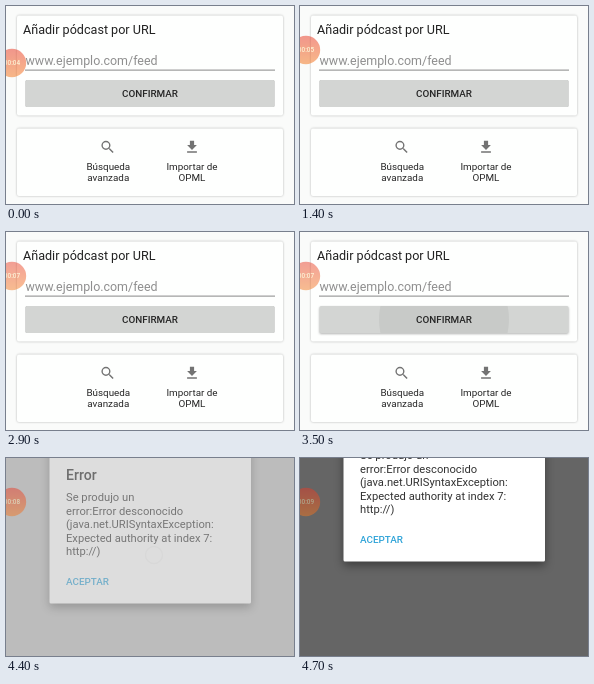
An HTML page that plays this animation: 288x198 px, repeating every 5300 ms.

```html
<!DOCTYPE html>
<html lang="es">
<head>
<meta charset="utf-8">
<title>Añadir pódcast</title>
<style>
html, body { margin: 0; width: 100%; height: 100%; overflow: hidden; background: #fafbfa; }
svg { display: block; width: 100vw; height: 100vh; font-family: Roboto, sans-serif; }
.card { fill: #fefffe; filter: drop-shadow(0 .7px .9px rgba(0,0,0,.28)); }
.label { font-size: 9.85px; fill: #262626; text-anchor: middle; }
.icon { fill: #737373; }
.body { font-size: 11.2px; fill: #333; }
.bold { font-weight: 500; }
</style>
</head>
<body>
<svg viewBox="0 0 288 198">
  <defs>
    <linearGradient id="fire" x1="0" y1="0" x2="0" y2="1">
      <stop offset="0" stop-color="#e93a27"/>
      <stop offset="1" stop-color="#f4791f"/>
    </linearGradient>
    <clipPath id="btnClip"><rect x="19.5" y="74" width="249" height="27" rx="1.5"/></clipPath>
  </defs>
  <rect width="288" height="198" fill="#fafbfa"/>

  <g id="page">
    <rect class="card" x="11" y="9.5" width="266" height="100" rx="2"/>
    <text x="17" y="28" font-size="12.6" fill="#222">Añadir pódcast por URL</text>
    <text x="19.5" y="58.5" font-size="12.45" fill="#8f8f8f">www.ejemplo.com/feed</text>
    <rect x="19" y="63.6" width="250" height="1" fill="#888"/>
    <rect id="btn" x="19.5" y="74" width="249" height="27" rx="1.5" fill="#d3d5d3"/>
    <circle id="ripple" cx="144" cy="87.5" r="0" fill="#000" clip-path="url(#btnClip)"/>
    <text class="label bold" x="144" y="91">CONFIRMAR</text>

    <rect class="card" x="11" y="122.5" width="266" height="67.5" rx="2"/>
    <path class="icon" transform="translate(93.3 132.7) scale(.7)" d="M15.5 14h-.79l-.28-.27A6.47 6.47 0 0 0 16 9.5 6.5 6.5 0 1 0 9.5 16c1.61 0 3.09-.59 4.23-1.57l.27.28v.79l5 4.99L20.49 19l-4.99-5zm-6 0a4.5 4.5 0 1 1 0-9 4.5 4.5 0 0 1 0 9z"/>
    <path class="icon" transform="translate(177.6 132.7) scale(.7)" d="M19 9h-4V3H9v6H5l7 7 7-7zM5 18v2h14v-2H5z"/>
    <text class="label" x="102.3" y="163.5">Búsqueda</text>
    <text class="label" x="102.3" y="175">avanzada</text>
    <text class="label" x="186" y="163.5">Importar de</text>
    <text class="label" x="186" y="175">OPML</text>
  </g>

  <rect id="dim" width="288" height="198" fill="#000" opacity="0"/>

  <g id="dialog" opacity="0">
    <rect x="43.5" y="-30" width="201.5" height="167.5" rx="1.5" fill="#fff" style="filter:drop-shadow(0 4px 5px rgba(0,0,0,.4))"/>
    <text class="bold" x="60" y="14" font-size="14.1" fill="#222">Error</text>
    <g id="message" class="body"></g>
    <text class="bold" x="60" y="119" font-size="9.85" fill="#2ea3d8">ACEPTAR</text>
    <circle id="spinner" cx="148" cy="89" r="8.5" fill="none" stroke="#f5f5f5" stroke-width="1.5"/>
  </g>

  <g id="bubble">
    <circle r="16.3" fill="url(#fire)"/>
    <text id="clock" class="bold" y="2.6" font-size="7.4" fill="#ffebb0" text-anchor="middle"></text>
  </g>
</svg>
<script>
const LOOP = 5300, STEP = 100;
const TICKS = [900, 2000, 2900, 3700, 4700];
const $ = id => document.getElementById(id);
const set = (id, attrs) => {
  for (const k in attrs) $(id).setAttribute(k, attrs[k]);
};

// Progress from 0 to 1 between two times, clamped outside
const ramp = (t, from, to) => Math.min(1, Math.max(0, (t - from) / (to - from)));
const ease = (t, from, to) => {
  const k = ramp(t, from, to);
  return k * k * (3 - 2 * k);
};

const lines = ["Se produjo un", "error:Error desconocido", "(java.net.URISyntaxException:",
  "Expected authority at index 7:", "http://)"];
$("message").innerHTML = lines.map((s, i) => `<text x="60" y="${35.2 + i * 13.45}">${s}</text>`).join("");

// Floating timer: pulled out along an arc, then snapping back to the edge
function drawBubble(t) {
  const out = ease(t, 500, 900), back = ease(t, 950, 1250);
  const x = 6 + 36.3 * (out - back);
  const y = 57 + 5 * Math.sin(Math.PI * out) - 13 * ease(t, 600, 1000);
  const awake = ramp(t, 0, 200) - ramp(t, 1200, 1400);
  set("bubble", {
    transform: `translate(${x} ${y}) scale(${.87 + .13 * awake})`,
    opacity: .52 + .48 * awake - .04 * ramp(t, 2800, 2900)
  });
  $("clock").textContent = "00:0" + (4 + TICKS.filter(k => t >= k).length);
}

function drawButton(t) {
  const held = ramp(t, 3300, 3700);
  set("ripple", { r: 130 * held, opacity: .05 + .025 * ramp(t, 4000, 4200) });
  const lift = .7 + .6 * held;
  $("btn").style.filter = `drop-shadow(0 ${lift}px ${lift}px rgba(0,0,0,.3))`;
}

function drawDialog(t) {
  const show = ramp(t, 4300, 4500), up = ramp(t, 4500, 4700);
  const rise = up * (2 - up);
  set("page", { visibility: t < 4400 ? "visible" : "hidden" });
  set("dim", { opacity: .5 * show + .095 * rise });
  set("dialog", { opacity: show, transform: `translate(0 ${16 * (1 - show) - 34 * rise})` });
  set("spinner", { opacity: t < 4600 ? 1 : 0 });
}

const start = performance.now();
function frame() {
  const now = (performance.now() - start) % LOOP;
  const t = Math.floor(now / STEP) * STEP;
  drawBubble(t);
  drawButton(t);
  drawDialog(t);
  requestAnimationFrame(frame);
}
frame();
</script>
</body>
</html>
```
